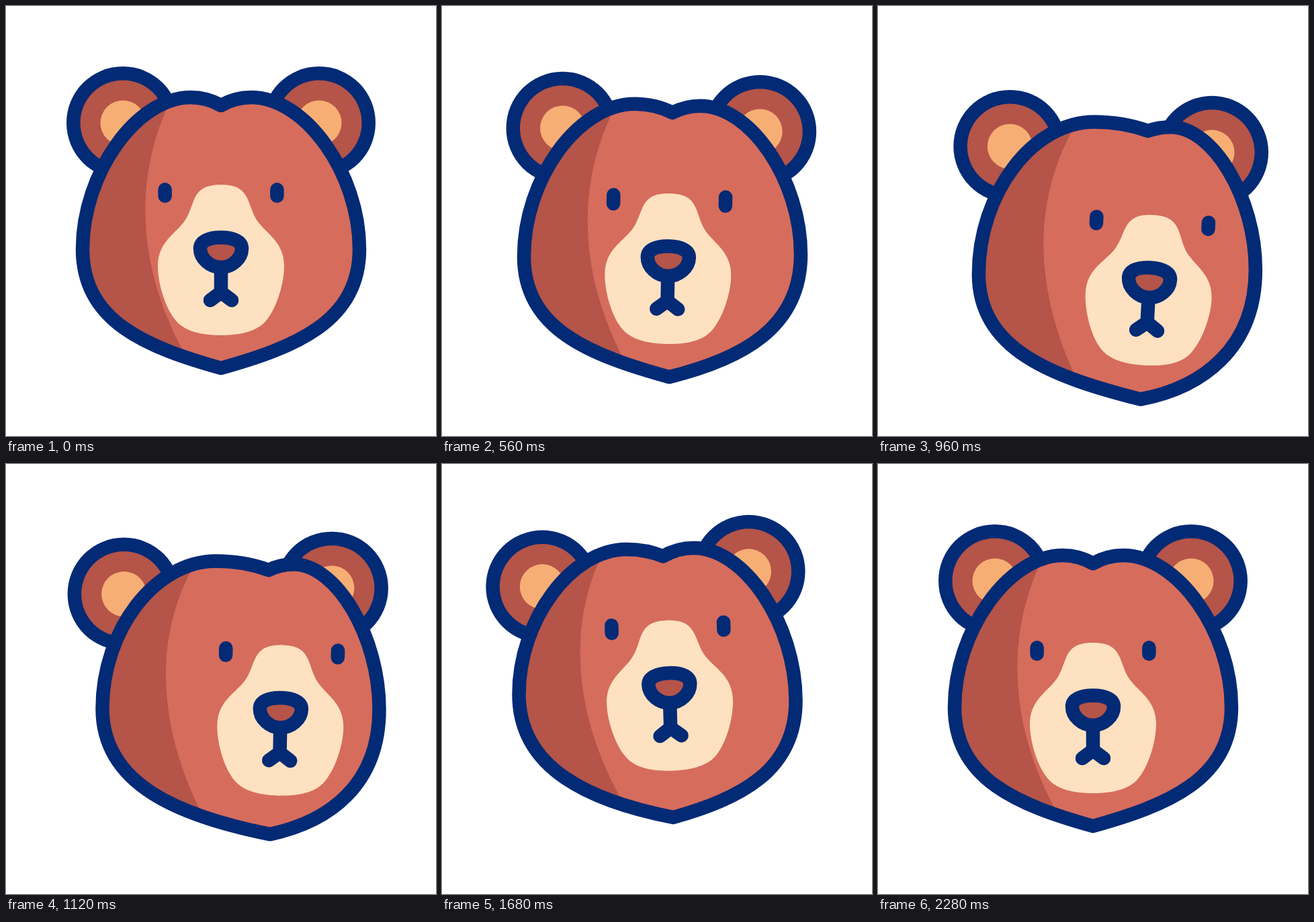
Write an HTML page with a canvas that moves like this. It is 640x640 px and loops after 2.4 s.

```html
<!DOCTYPE html>
<html lang="en">
<head>
<meta charset="utf-8">
<title>Bear</title>
<style>
html, body { margin: 0; height: 100%; overflow: hidden; background: #fff; }
canvas { display: block; width: 100vw; height: 100vh; }
</style>
</head>
<body>
<canvas id="stage"></canvas>
<script>
const LOOP = 2400, STEP = 40;
const NAVY = '#032a75', RED = '#d66c5c', DARK = '#b55448', CREAM = '#fde1c0', TAN = '#f7ae74';

// x, y: head shift; turn: how far the middle of the head moves sideways;
// tilt: head angle in radians; fx, fy: face shift; eye: eye length
const rest = { x: 0, y: 0, turn: 0, tilt: 0, fx: 0, fy: 0, eye: 9.6 };
const keys = [
  { t: 200, ...rest },
  { t: 560, x: 8, y: 12, turn: 12.5, tilt: .013, fx: 16.5, fy: 13, eye: 13 },
  { t: 800, x: 25, y: 33, turn: 36, tilt: .036, fx: 56, fy: 37, eye: .01 },
  { t: 940, x: 36, y: 43, turn: 40, tilt: .03, fx: 82, fy: 46, eye: 10 },
  { t: 1120, x: 29.5, y: 11, turn: 42.5, tilt: -.005, fx: 88.5, fy: 3.5, eye: 10.5 },
  { t: 1440, x: 1.5, y: -19.5, turn: 32, tilt: -.064, fx: 44, fy: -55, eye: 13 },
  { t: 2000, ...rest },
];

const slope = (a, b, k) => a && b ? (b[k] - a[k]) / (b.t - a.t) : 0;

// Smooth tangent that never overshoots a key
function tangent(a, b, c, k) {
  const u = slope(a, b, k), v = slope(b, c, k);
  return u * v > 0 ? 2 * u * v / (u + v) : 0;
}

function poseAt(time) {
  const n = keys.findIndex(key => key.t > time);
  if (n < 1) return rest;
  const a = keys[n - 1], b = keys[n], span = b.t - a.t;
  const t = (time - a.t) / span, s = t * t * (3 - 2 * t), pose = {};
  for (const k in rest) {
    const m0 = tangent(keys[n - 2], a, b, k), m1 = tangent(a, b, keys[n + 1], k);
    pose[k] = a[k] + (b[k] - a[k]) * s + span * t * (1 - t) * (m0 * (1 - t) - m1 * t);
  }
  return pose;
}

// Damped wobble of the ears after the head has come back
function wobble(time) {
  const u = (time - 1760) / 320;
  return u > 0 && u < 1.6 ? .06 * Math.sin(Math.PI * u) * (1 - u / 1.6) ** 2 : 0;
}

const stage = document.getElementById('stage');
const scale = window.devicePixelRatio || 1;
stage.width = stage.height = 640 * scale;
const g = stage.getContext('2d');

const halfMuzzle = new Path2D('M322 266 H320 C298 266 287 272 280 288 C274 302 272 314 261 326 ' +
  'C247 342 226 355 226 387 C226 410 235 445 251 466 C264 484 290 490 320 490 H322 Z');
const nose = new Path2D('M320 344.5 C338 344.5 351 350 351 361 C351 376 336 389 320 389 ' +
  'C304 389 289 376 289 361 C289 350 302 344.5 320 344.5 Z');
const mouth = new Path2D('M320 389 V426 M304 438 L320 426 L336 438');

const mix = (a, b, k) => a + (b - a) * k;

// Anchor points of the head outline for a pose
function headPoints({ x, y, turn, tilt }) {
  return {
    crease: [320 + x + turn + 195 * tilt, 148 + .9 * y],
    chin: [320 + x + turn - 196 * tilt, 539 + 1.1 * y],
    sides: [
      [114 + x, 362 + y - .2 * turn + 110 * tilt],
      [526 + x, 362 + y - .2 * turn - 140 * tilt],
    ],
    crowns: [
      [275 + x + .2 * turn + 100 * tilt, 136 + y - .07 * turn - 100 * tilt],
      [365 + x + .8 * turn + 100 * tilt, 136 + y + .05 * turn],
    ],
  };
}

// One half of the outline, from crease to chin, as bezier points
function halfOutline([cx, cy], [lx, ly], [sx, sy], [bx, by], bulge, chinSlope) {
  const reach = (sx - bx) * .534;
  return [
    [cx, cy], [mix(cx, lx, .31), mix(cy, ly, .67)], [mix(lx, cx, .33), ly],
    [lx, ly], [mix(lx, sx, bulge), ly], [sx, mix(sy, ly, bulge)],
    [sx, sy], [sx, mix(sy, by, .61)], [bx + reach, by - Math.abs(reach) * chinSlope],
    [bx, by],
  ];
}

function headPath({ crease, chin, sides, crowns }, { turn, tilt }) {
  const base = .28 - .0017 * turn, path = new Path2D();
  const left = halfOutline(crease, crowns[0], sides[0], chin, .5 + .0008 * turn, base + 1.5 * tilt);
  const right = halfOutline(crease, crowns[1], sides[1], chin, .5, base - .8 * tilt);
  const points = [...left, ...right.reverse().slice(1)];
  path.moveTo(...points[0]);
  for (let i = 1; i < points.length; i += 3) {
    path.bezierCurveTo(...points[i], ...points[i + 1], ...points[i + 2]);
  }
  path.closePath();
  return path;
}

function disc(x, y, r, color) {
  g.fillStyle = color;
  g.beginPath();
  g.arc(x, y, r, 0, 7);
  g.fill();
}

function drawEar(x, y, swing) {
  const dx = 169 * swing, dy = (x - 320) * swing;
  disc(x + dx, y + dy, 84, NAVY);
  disc(x + dx, y + dy, 63.5, DARK);
  disc(x + dx, y + dy, 33.5, TAN);
}

function drawEars({ x, y, turn, tilt }, swing) {
  drawEar(174 + x - .61 * turn + 395 * tilt, 174 + y + .145 * turn - 466 * tilt, swing);
  drawEar(466 + x - .23 * turn + 160 * tilt, 174 + y + 60 * tilt, swing);
}

function drawHead(pose) {
  const points = headPoints(pose), path = headPath(points, pose), { tilt } = pose;
  const [lx, ly] = points.crowns[0], [sx, sy] = points.sides[0], by = points.chin[1];
  g.fillStyle = RED;
  g.fill(path);
  g.save();
  g.clip(path);
  g.fillStyle = DARK;
  g.beginPath();
  g.moveTo(lx - 25 + 115 * tilt, ly - 6);
  g.bezierCurveTo(sx + 74 + 60 * tilt, sy - 112, sx + 79 + 60 * tilt, sy + 28,
    sx + 156 - 90 * tilt, by - 14);
  g.lineTo(sx - 20, by + 20);
  g.lineTo(sx - 20, ly - 20);
  g.fill();
  g.restore();
  g.stroke(path);
}

function drawFace({ fx, fy, turn, tilt, eye }) {
  g.save();
  g.translate(320 + fx, 378 + fy);
  g.rotate(tilt + .0006 * turn);
  g.translate(-320, -378);
  for (let side = 0; side < 2; side++) {
    g.fillStyle = CREAM;
    g.fill(halfMuzzle);
    g.beginPath();
    g.moveTo(236.6, 282.8);
    g.lineTo(236.6, 282.8 - eye);
    g.stroke();
    g.translate(640, 0);
    g.scale(-1, 1);
  }
  g.fillStyle = DARK;
  g.fill(nose);
  g.stroke(nose);
  g.stroke(mouth);
  g.restore();
}

function draw(now) {
  const time = Math.floor(now % LOOP / STEP) * STEP, pose = poseAt(time);
  g.setTransform(scale, 0, 0, scale, 0, 0);
  g.fillStyle = '#fff';
  g.fillRect(0, 0, 640, 640);
  g.strokeStyle = NAVY;
  g.lineWidth = 20.5;
  g.lineCap = g.lineJoin = 'round';
  drawEars(pose, wobble(time));
  drawHead(pose);
  drawFace(pose);
}

const start = performance.now();
function tick() {
  draw(performance.now() - start);
  requestAnimationFrame(tick);
}
tick();
</script>
</body>
</html>
```
